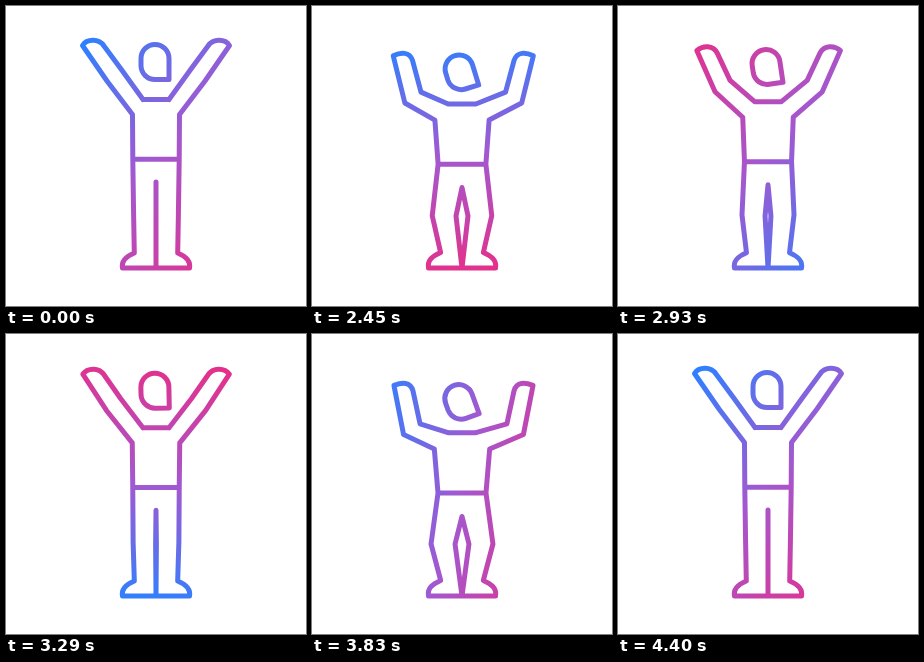
Animation, 300 px wide and 300 px high, one loop 4.46 s. Source, as an HTML page:

```html
<!DOCTYPE html>
<html lang="en">
<head>
<meta charset="utf-8">
<title>Arms up</title>
<style>
  html, body { margin: 0; width: 100%; height: 100%; overflow: hidden; background: #fff; }
  svg { display: block; width: 100%; height: 100%; }
</style>
</head>
<body>
<svg viewBox="0 0 300 300" fill="none" stroke="url(#ink)" stroke-width="5" stroke-linecap="round" stroke-linejoin="round">
  <defs>
    <linearGradient id="ink" gradientUnits="userSpaceOnUse">
      <stop offset="0" stop-color="#2e80ff"/>
      <stop offset=".5" stop-color="#a358d0"/>
      <stop offset="1" stop-color="#e4308a"/>
    </linearGradient>
  </defs>
  <path id="figure"/>
</svg>
<script>
const LOOP = 4460, START = 2000, BEAT = 1200;
const figure = document.getElementById('figure');
const ink = document.getElementById('ink');

// Left half, from neck over the arm down to the foot: [straight x, y, bent x, y]
const HALF = [
  [137, 93.5, 136, 98.7],      // neck
  [115, 63, 108, 90],          // inner elbow
  [98, 40, 101, 57],           // hand
  [93, 32.5, 98.5, 47.5],
  [81, 32.5, 90, 48.5],
  [76.5, 39.5, 82, 51.5],
  [101, 75, 91.5, 100.7],      // outer elbow
  [126.5, 108.5, 122.3, 115],  // shoulder
  [126.8, 153.3, 126, 159],    // waist
  [127.6, 208, 119, 210],      // knee
  [128.3, 247, 128.7, 246.5],  // ankle
  [121, 250, 121, 250],
  [115, 254, 115, 254],
  [116.5, 262, 116.5, 262]     // toe
];
const COMMANDS = ['M', 'L', 'L', 'C', '', '', 'L', 'L', 'L', 'L', 'L', 'C', '', ''];

// Gradient turn: [time, angle of the blue end clockwise from up, half length]
const TURN = [
  [2000, -45, 131], [2450, -6, 118], [2930, 134, 138],
  [3290, 186, 120], [3830, 285, 108], [4400, 315, 131]
];

const mix = (a, b, k) => a + (b - a) * k;

function slope(i, col) {
  if (i === 0 || i === TURN.length - 1) return 0;
  const a = TURN[i - 1], b = TURN[i + 1];
  return (b[col] - a[col]) / (b[0] - a[0]);
}

function sample(t, col) {
  if (t <= TURN[0][0]) return TURN[0][col];
  const j = TURN.findIndex(key => key[0] > t);
  if (j < 0) return TURN[TURN.length - 1][col];
  const a = TURN[j - 1], b = TURN[j], span = b[0] - a[0];
  const u = (t - a[0]) / span, v = 1 - u;
  return a[col] * (1 + 2 * u) * v * v + b[col] * (1 + 2 * v) * u * u
    + span * u * v * (slope(j - 1, col) * v - slope(j, col) * u);
}

function half(bend, right) {
  return HALF.map(([x0, y0, x1, y1], i) => {
    let x = mix(x0, x1, bend);
    if (right) x = 300 - x + (i > 0 && i < 7 ? 3 * bend : 0);
    return `${COMMANDS[i]}${x} ${mix(y0, y1, bend)} `;
  }).join('');
}

function head(bend) {
  const tilt = -20 * bend * Math.PI / 180;
  const c = Math.cos(tilt), s = Math.sin(tilt);
  const cx = 149 - bend, cy = 56 + 12 * bend;
  const p = (x, y) => `${cx + x * c - y * s} ${cy + x * s + y * c}`;
  return `M${p(14, 17.5)}L${p(0, 17.5)}A14 14 0 0 1 ${p(-14, 4)}L${p(-14, -3.5)}`
    + `A14 14 0 0 1 ${p(14, -3.5)}Z`;
}

function pose(bend) {
  const neck = mix(93.5, 98.7, bend), waist = mix(153.3, 159, bend);
  const wx = mix(126.8, 126, bend), gap = 7 * bend;
  const crotch = mix(176, 182.5, bend);
  return half(bend, false) + half(bend, true) + head(bend)
    + `M137 ${neck}H163M${wx} ${waist}H${300 - wx}M116.5 262H183.5`
    + `M150 ${crotch}L${150 - gap} 210L150 262L${150 + gap} 210Z`;
}

function draw(t) {
  const beat = t > START && t < START + 2 * BEAT ? (t - START) / BEAT : 0;
  figure.setAttribute('d', pose((1 - Math.cos(2 * Math.PI * beat)) / 2));

  const angle = sample(t, 1) * Math.PI / 180, size = sample(t, 2);
  const dx = Math.sin(angle) * size, dy = -Math.cos(angle) * size;
  const ends = { x1: 150 + dx, y1: 150 + dy, x2: 150 - dx, y2: 150 - dy };
  for (const name in ends) ink.setAttribute(name, ends[name]);
}

const begin = performance.now();
function tick() {
  draw((performance.now() - begin) % LOOP);
  requestAnimationFrame(tick);
}
tick();
</script>
</body>
</html>
```
